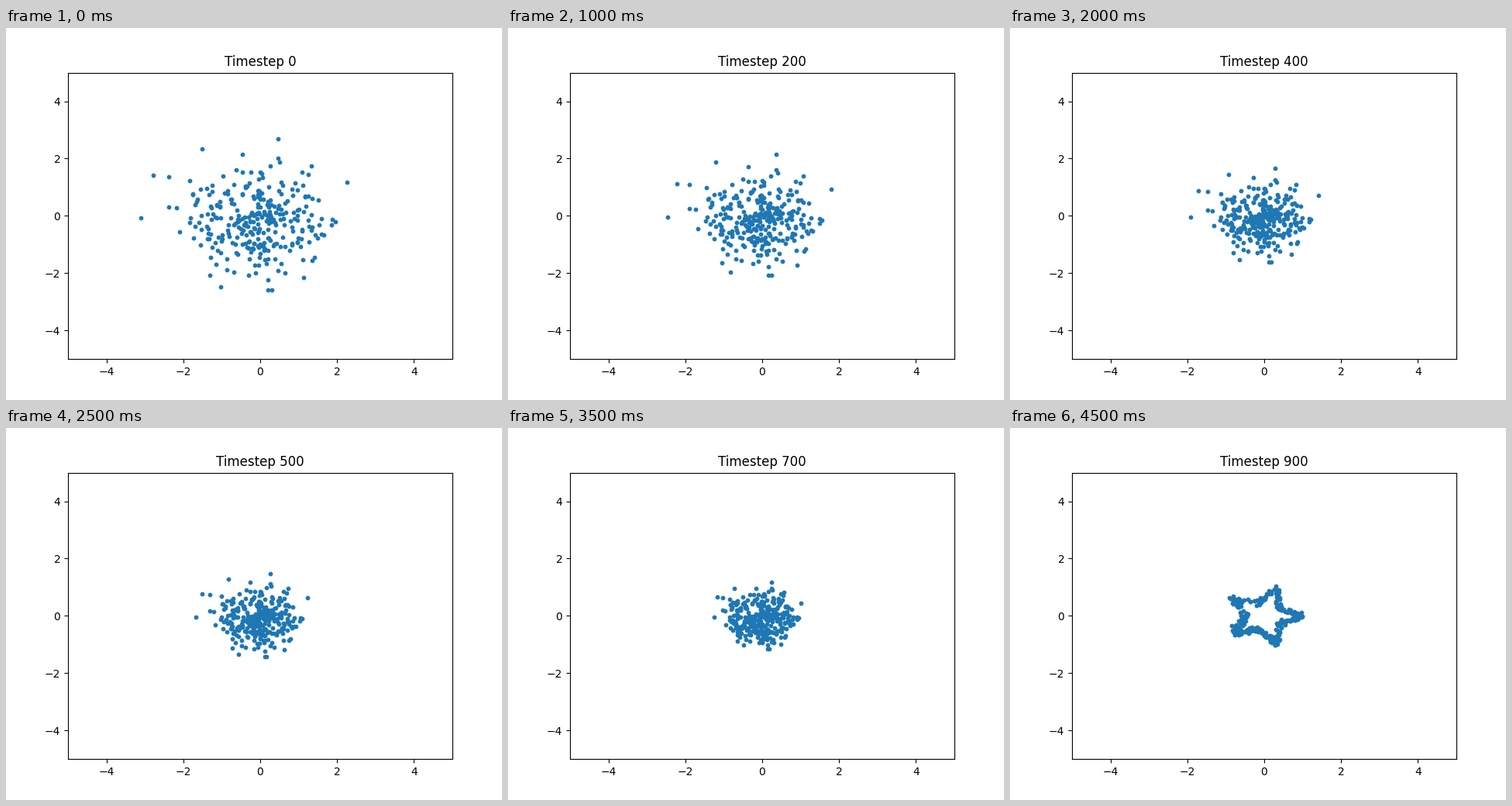
These frames come from a looping animation (640x480 px, 5000 ms). A matplotlib script:

```python
import numpy as np
import matplotlib.pyplot as plt
from matplotlib.animation import FuncAnimation

COUNT = 300
FRAMES = 10
SUBSTEPS = 20
SPEED = 1.06

# The farthest start points, which give the cloud its outline
OUTLINE = [
    (-3.10, -.07), (-2.78, 1.42), (-2.38, 1.36), (-1.51, 2.34), (-.46, 2.15),
    (.46, 2.69), (1.33, 1.74), (2.26, 1.17), (1.13, -2.15), (.30, -2.59),
    (.20, -2.59), (.20, -2.24), (-1.03, -2.48), (-1.31, -2.07), (-2.10, -.56),
    (-2.18, .28), (-2.38, .31), (-1.83, 1.23),
]


def start_points():
    rng = np.random.default_rng(7)
    cloud = rng.normal(size=(2 * COUNT, 2))
    cloud = cloud[np.hypot(*cloud.T) < 2.1]
    return np.vstack([OUTLINE, cloud[:COUNT - len(OUTLINE)]])


def star_outline(outer=1.1, inner=0.5, per_edge=40):
    k = np.arange(11)
    angle = k * np.pi / 5
    radius = np.where(k % 2 == 0, outer, inner)
    corners = np.column_stack([radius * np.cos(angle), radius * np.sin(angle)])
    u = (np.arange(per_edge) + 0.5)[:, None] / per_edge
    return np.vstack([a + (b - a) * u for a, b in zip(corners, corners[1:])])


def velocity(x, t, star):
    """Flow-matching velocity from unit Gaussian noise to the star."""
    d2 = ((x[:, None] - t * star) ** 2).sum(axis=2)
    d2 -= d2.min(axis=1, keepdims=True)
    w = np.exp(-d2 / (2 * (1 - t) ** 2))
    target = w @ star / w.sum(axis=1, keepdims=True)
    return (target - x) / (1 - t)


def make_paths():
    star = star_outline()
    x = start_points()
    dt = SPEED / (FRAMES * SUBSTEPS)
    paths = [x]
    for step in range((FRAMES - 1) * SUBSTEPS):
        x = x + dt * velocity(x, step * dt, star)
        if (step + 1) % SUBSTEPS == 0:
            paths.append(x)
    return paths


paths = make_paths()

fig, ax = plt.subplots(figsize=(6.4, 4.8), dpi=100)
ax.set_xlim(-5, 5)
ax.set_ylim(-5, 5)
dots = ax.scatter(*paths[0].T, s=10)
title = ax.set_title("Timestep 0")


def update(i):
    dots.set_offsets(paths[i])
    title.set_text(f"Timestep {100 * i}")
    return dots, title


anim = FuncAnimation(fig, update, frames=FRAMES, interval=500, repeat=True,
                     repeat_delay=0, blit=False)
plt.show()
```
